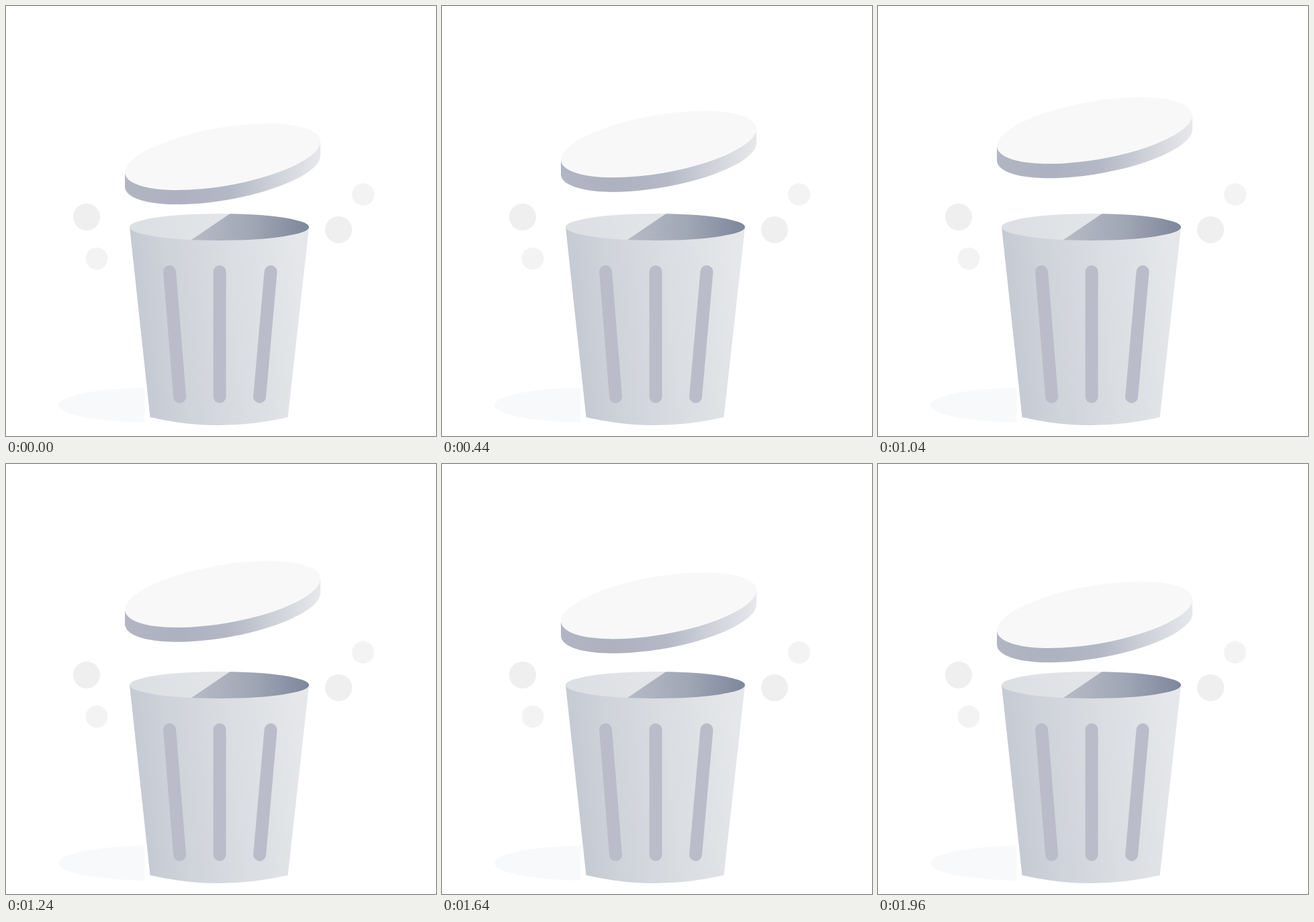
An HTML page that plays this animation: 640 px wide and 640 px high, repeating every 2 s.

```html
<!DOCTYPE html>
<html lang="en">
<head>
<meta charset="utf-8">
<title>Bin with a floating lid</title>
<style>
  html, body { margin: 0; width: 100%; height: 100%; overflow: hidden; background: #fff; }
  svg { display: block; width: 100%; height: 100%; }
</style>
</head>
<body>
<svg viewBox="0 0 640 640">
  <defs>
    <linearGradient id="rim" gradientUnits="userSpaceOnUse" x1="177" y1="0" x2="468" y2="0">
      <stop offset="0" stop-color="#b2b5c2"/>
      <stop offset=".28" stop-color="#adb1c0"/>
      <stop offset=".54" stop-color="#b5b9c6"/>
      <stop offset=".77" stop-color="#cfd2da"/>
      <stop offset="1" stop-color="#e7e8eb"/>
    </linearGradient>
    <linearGradient id="body" gradientUnits="userSpaceOnUse" x1="190" y1="480" x2="445" y2="450">
      <stop offset="0" stop-color="#c3c8d2"/>
      <stop offset=".25" stop-color="#cfd3da"/>
      <stop offset=".6" stop-color="#dadde1"/>
      <stop offset="1" stop-color="#e5e7ea"/>
    </linearGradient>
    <linearGradient id="inside" gradientUnits="userSpaceOnUse" x1="184" y1="0" x2="330" y2="0">
      <stop offset="0" stop-color="#dcdfe3"/>
      <stop offset="1" stop-color="#e3e5e8"/>
    </linearGradient>
    <linearGradient id="shade" gradientUnits="userSpaceOnUse" x1="280" y1="0" x2="451" y2="0">
      <stop offset="0" stop-color="#b5bac5"/>
      <stop offset=".5" stop-color="#a0a7b5"/>
      <stop offset="1" stop-color="#7d879b"/>
    </linearGradient>
    <clipPath id="mouth"><ellipse cx="317.5" cy="329" rx="133.5" ry="20"/></clipPath>
    <clipPath id="floor"><rect x="0" y="540" width="206.5" height="100"/></clipPath>
  </defs>

  <ellipse cx="218" cy="594" rx="140" ry="26" fill="#f8f9fb" clip-path="url(#floor)"/>

  <circle cx="120" cy="314" r="20" fill="#efefef"/>
  <circle cx="135" cy="376" r="16.5" fill="#f3f3f3"/>
  <circle cx="495" cy="333" r="20" fill="#efefef"/>
  <circle cx="531.5" cy="280.5" r="16.5" fill="#f3f3f3"/>

  <path d="M184 329L214.500 612Q317 636 419.500 612L451 329Z" fill="url(#body)"/>
  <g clip-path="url(#mouth)">
    <rect x="180" y="305" width="275" height="48" fill="url(#inside)"/>
    <path d="M333.500 309L276 348V352H455V305H339Z" fill="url(#shade)"/>
  </g>
  <path d="M243.500 395.500L258.500 581.500M318 395.500V581.500M394 395.500L377.500 581.500"
        stroke="#babdc9" stroke-width="19" stroke-linecap="round"/>

  <g id="lid">
    <path d="M177 247.500V270A147.500 43.300 -9.800 0 0 468 223.500V201.500Z" fill="url(#rim)"/>
    <ellipse cx="322.5" cy="224.5" rx="147.5" ry="43.3" transform="rotate(-9.8 322.5 224.5)" fill="#f8f8f8"/>
  </g>
</svg>
<script>
  const LOOP = 2000, STEP = 40, PEAK = 980, RISE = 41.7;
  const lid = document.getElementById('lid');
  const start = performance.now();

  // The lid rises and falls at constant speed.
  function render(ms) {
    const t = Math.floor((ms % LOOP) / STEP) * STEP;
    const lift = RISE * (1 - Math.abs(t - PEAK) / PEAK);
    lid.setAttribute('transform', `translate(0 ${-lift})`);
  }

  function tick() {
    render(performance.now() - start);
    requestAnimationFrame(tick);
  }
  tick();
</script>
</body>
</html>
```
